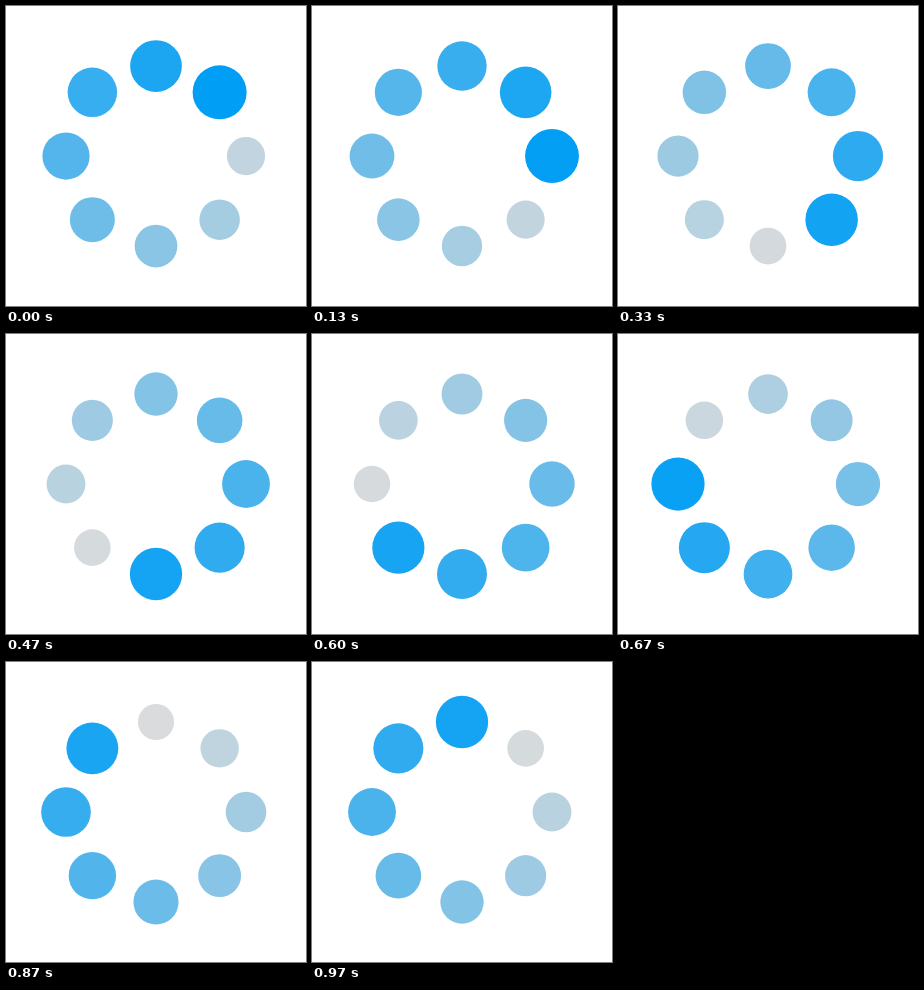
Recreate the animation shown at these times as an HTML page. Size 300 by 300 pixels, loop 1 s.

```html
<!DOCTYPE html>
<html lang="en">
<head>
<meta charset="utf-8">
<title>Loading spinner</title>
<style>
  html, body { margin: 0; width: 100%; height: 100%; overflow: hidden; background: #fff; }
  svg { display: block; width: 100%; height: 100%; }
</style>
</head>
<body>
<svg id="spinner" viewBox="0 0 300 300"></svg>
<script>
  const DOTS = 8, LOOP = 1000, STEPS = 30, RING = 90;
  const BRIGHT = [0, 158, 245], FADED = [220, 220, 220];
  const svg = document.getElementById('spinner');
  const mix = (a, b, p) => a + (b - a) * p;

  // Dots run clockwise from the upper right.
  const dots = Array.from({ length: DOTS }, (_, i) => {
    const angle = (i - 1) * 2 * Math.PI / DOTS;
    const dot = document.createElementNS('http://www.w3.org/2000/svg', 'circle');
    dot.setAttribute('cx', 150 + RING * Math.cos(angle));
    dot.setAttribute('cy', 150 + RING * Math.sin(angle));
    return svg.appendChild(dot);
  });

  // 30 steps per loop, each starting on the nearest 10 ms.
  function stepAt(ms) {
    const ticks = Math.floor((ms % LOOP) / 10 + 1e-6);
    return Math.floor((ticks + 0.34) * STEPS / 100);
  }

  function draw(ms) {
    const time = stepAt(ms) / STEPS;
    dots.forEach((dot, i) => {
      const age = (time - i / DOTS + 1) % 1;
      const rgb = BRIGHT.map((c, n) => Math.round(mix(c, FADED[n], age)));
      dot.setAttribute('r', mix(27, 18, age));
      dot.setAttribute('fill', `rgb(${rgb})`);
    });
  }

  const start = performance.now();
  function tick() {
    draw(performance.now() - start);
    requestAnimationFrame(tick);
  }
  tick();
</script>
</body>
</html>
```
